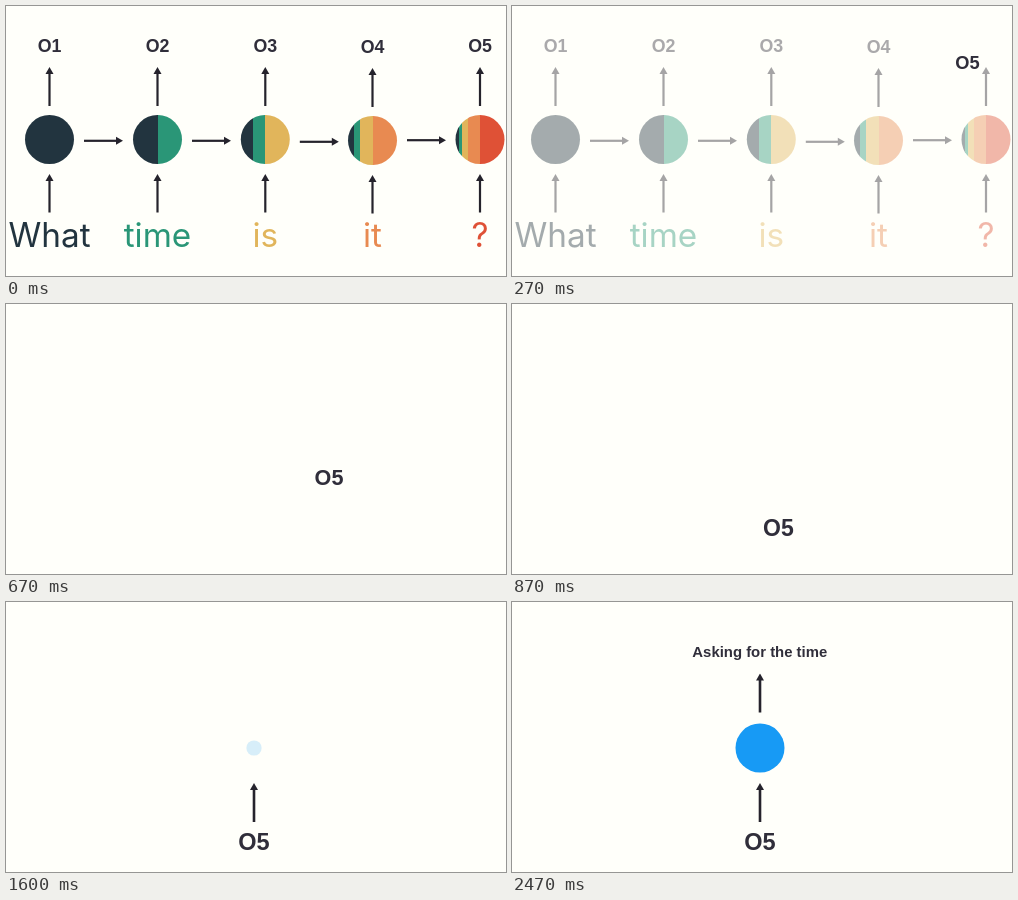
Write an HTML page with a canvas that moves like this. It is 500 by 270 pixels and loops after 2.6 s.

```html
<!DOCTYPE html>
<html lang="en">
<head>
<meta charset="utf-8">
<title>Sequence to intent</title>
<style>
  html, body { margin: 0; width: 100%; height: 100%; overflow: hidden; background: #fffffa; }
  canvas { display: block; width: 500px; height: 270px; }
</style>
</head>
<body>
<canvas id="stage" width="500" height="270"></canvas>
<script>
const ctx = document.getElementById('stage').getContext('2d');
const W = 500, H = 270, LOOP = 2600, STEP = LOOP / 39;
const PAPER = '#fffffa', INK = '#302e3a', ARROW = '#25232c', BLUE = '#179af5';
const RADIUS = 24.5;
const BOLD = '"Liberation Sans", Arial, sans-serif';
// drop: vertical offset of the column; link: height of the arrow to the next one
const columns = [
  { x: 43.5, drop: 0, link: 134.8, word: 'What', color: '#22343f' },
  { x: 151.5, drop: 0, link: 134.8, word: 'time', color: '#2a9677' },
  { x: 259.3, drop: 0, link: 135.8, word: 'is', color: '#e1b55b' },
  { x: 366.5, drop: 1, link: 134.2, word: 'it', color: '#e88a51' },
  { x: 474, drop: 0, word: '?', color: '#df5136' }
];

const progress = (t, start, duration) => Math.min(1, Math.max(0, (t - start) / duration));
const mix = (a, b, p) => a + (b - a) * p;

// Same curve as cubic-bezier(0.42, 0, 0.58, 1), solved by bisection.
function easeInOut(p) {
  let low = 0, high = 1, s = 0.5;
  for (let i = 0; i < 20; i++) {
    s = (low + high) / 2;
    const x = 3 * (1 - s) * s * mix(0.42, 0.58, s) + s ** 3;
    if (x < p) low = s; else high = s;
  }
  return s * s * (3 - 2 * s);
}

function text(str, x, baseline, font, color) {
  ctx.font = font;
  ctx.fillStyle = color;
  ctx.textAlign = 'center';
  ctx.fillText(str, x, baseline);
}

function label(str, x, centerY, size) {
  text(str, x, centerY + size * 0.355, `bold ${size}px ${BOLD}`, INK);
}

function disc(x, y, r, color) {
  ctx.fillStyle = color;
  ctx.beginPath();
  ctx.arc(x, y, r, 0, Math.PI * 2);
  ctx.fill();
}

// Arrow with its tip at (x, y), pointing up unless rotated.
function arrow(x, y, length, width, angle = 0) {
  ctx.save();
  ctx.translate(x, y);
  ctx.rotate(angle);
  ctx.fillStyle = ARROW;
  ctx.fillRect(-width / 2, 5, width, length - 5);
  ctx.beginPath();
  ctx.moveTo(0, 0);
  ctx.lineTo(4, 7);
  ctx.lineTo(-4, 7);
  ctx.fill();
  ctx.restore();
}

function wipedArrow(x, y, length, p) {
  if (p <= 0) return;
  ctx.save();
  ctx.beginPath();
  ctx.rect(x - 6, y + length * (1 - p), 12, length * p + 1);
  ctx.clip();
  arrow(x, y, length, 2.6);
  ctx.restore();
}

// Each new word takes half of the state; older ones are halved again.
function stateDisc(x, y, count) {
  const edge = i => Math.round(x - RADIUS + (i ? 2 * RADIUS / 2 ** (count - i) : -1));
  for (let i = 0; i < count; i++) {
    const right = i < count - 1 ? edge(i + 1) : x + RADIUS + 1;
    ctx.save();
    ctx.beginPath();
    ctx.rect(edge(i), y - RADIUS - 1, right - edge(i), 2 * RADIUS + 2);
    ctx.clip();
    disc(x, y, RADIUS, columns[i].color);
    ctx.restore();
  }
}

function drawNetwork(fade) {
  if (fade >= 1) return;
  columns.forEach(({ x, drop, link, word, color }, i) => {
    if (link) {
      label('O' + (i + 1), x, 40 + drop, 17.8);
      arrow(x + 73.5, link, 39, 2.2, Math.PI / 2);
    }
    arrow(x, 61 + drop, 39, 2.2);
    arrow(x, 168 + drop, 38.5, 2.2);
    stateDisc(x, 133.5 + drop, i + 1);
    text(word, x, 241, '33.3px Inter, sans-serif', color);
  });
  ctx.globalAlpha = fade;
  ctx.fillStyle = PAPER;
  ctx.fillRect(0, 0, W, H);
  ctx.globalAlpha = 1;
}

function drawIntent(t) {
  wipedArrow(248, 181, 39, progress(t, 1100, 330));

  const grow = progress(t, 1530, 225);
  ctx.globalAlpha = grow ** 1.5;
  disc(248, 146, RADIUS * grow, BLUE);
  ctx.globalAlpha = 1;

  wipedArrow(248, 71.5, 39, progress(t, 1700, 160));

  ctx.globalAlpha = progress(t, 1830, 160);
  text('Asking for the time', 247.8, 55, `bold 14.9px ${BOLD}`, INK);
  ctx.globalAlpha = 1;
}

function draw(t) {
  ctx.fillStyle = PAPER;
  ctx.fillRect(0, 0, W, H);
  drawNetwork(progress(t, 90, 300));
  drawIntent(t);
  const move = easeInOut(progress(t, STEP, 1000));
  label('O5', mix(474, 248, move), mix(40, 240, move), mix(17.8, 23.5, move));
}

const origin = performance.now();
function tick() {
  const t = (performance.now() - origin) % LOOP;
  draw(Math.floor((t + 4) / STEP) % 39 * STEP);
  requestAnimationFrame(tick);
}
tick();
</script>
</body>
</html>
```
